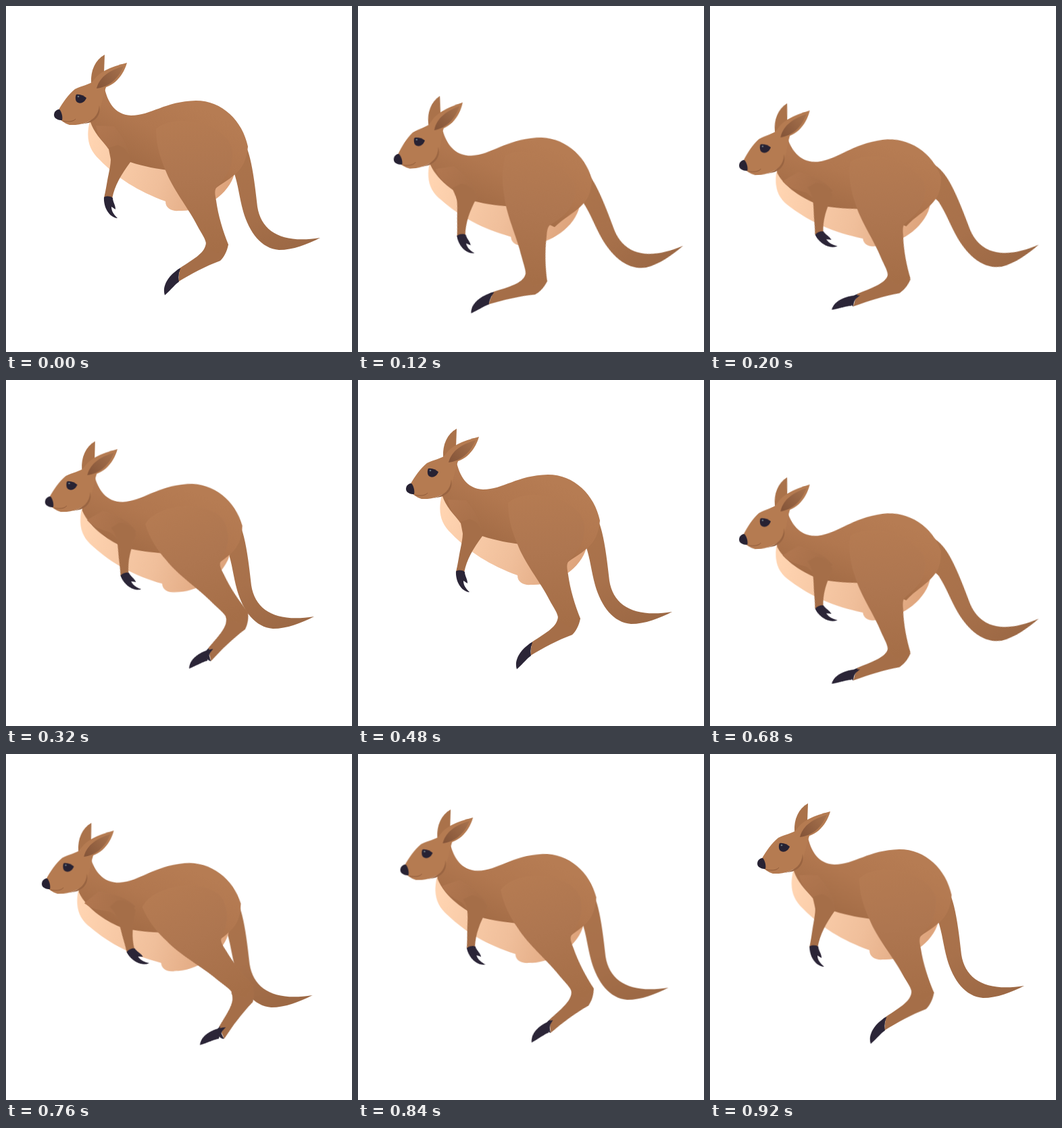
An HTML page that plays this animation: 512 by 512 pixels, repeating every 960 ms.

```html
<!DOCTYPE html>
<html lang="en">
<head>
<meta charset="utf-8">
<title>Kangaroo hop</title>
<style>
  html, body { margin: 0; width: 100%; height: 100%; overflow: hidden; background: #fff; }
  svg { display: block; width: 100vw; height: 100vh; }
  g { transform-origin: 0 0; }
</style>
</head>
<body>
<svg viewBox="0 0 512 512">
  <defs>
    <linearGradient id="fur" gradientUnits="userSpaceOnUse" x1="270" y1="140" x2="215" y2="248">
      <stop offset="0" stop-color="#b67c53"/><stop offset=".5" stop-color="#b1774f"/><stop offset="1" stop-color="#a36c46"/>
    </linearGradient>
    <linearGradient id="thighFur" gradientUnits="userSpaceOnUse" x1="270" y1="165" x2="300" y2="360">
      <stop offset="0" stop-color="#b57b52"/><stop offset=".45" stop-color="#ae7650"/><stop offset="1" stop-color="#a56e47"/>
    </linearGradient>
    <linearGradient id="tailFur" gradientUnits="userSpaceOnUse" x1="345" y1="220" x2="410" y2="360">
      <stop offset="0" stop-color="#ab734b"/><stop offset=".5" stop-color="#a8714b"/><stop offset="1" stop-color="#9d6945"/>
    </linearGradient>
    <linearGradient id="cream" gradientUnits="userSpaceOnUse" x1="125" y1="200" x2="325" y2="270">
      <stop offset="0" stop-color="#ffd4b1"/><stop offset=".55" stop-color="#f0bf9b"/><stop offset="1" stop-color="#dea47c"/>
    </linearGradient>
    <linearGradient id="armFur" gradientUnits="userSpaceOnUse" x1="140" y1="180" x2="172" y2="232">
      <stop offset="0" stop-color="#b0764f"/><stop offset="1" stop-color="#a56e48"/>
    </linearGradient>
    <linearGradient id="earIn" gradientUnits="userSpaceOnUse" x1="136" y1="120" x2="172" y2="90">
      <stop offset="0" stop-color="#855539"/><stop offset="1" stop-color="#a6714c"/>
    </linearGradient>
  </defs>

  <g id="tail">
    <path fill="url(#tailFur)" d="M318 178C340 178 355 198 361 225C366 245 369 270 372 297C378 335 410 352 465 343C445 353 425 361 404 361C378 359 360 335 351 304C345 282 344 266 337 245L318 215Z"/>
  </g>

  <g id="body">
    <path fill="url(#cream)" d="M124 170C118 195 122 212 138 227C165 255 195 274 236 289C236 300 246 304 256 303C290 305 330 280 338 248L300 200L180 180Z"/>
    <path fill="url(#fur)" d="M146 122C150 140 160 161 185 162C215 162 235 141 281 140C320 140 350 170 358 208C356 228 350 240 339 249C328 259 314 265 300 278L240 243C225 241 205 238 184 231C165 222 135 200 125 172L125 140Z"/>
    <g id="thigh">
      <g id="foot">
        <path fill="#a56e48" d="M296 350C295 365 280 373 257 388L255 408C275 396 295 385 317 377C323 371 327 363 329 353L312 340Z"/>
        <path fill="#2b2537" d="M258 388C248 391 248 405 255 408Q254 398 258 388Z"/>
        <g id="toe">
          <path fill="#2b2537" d="M258 388C243 396 230 413 235 428C245 419 250 412 256 408Q254 398 258 388Z"/>
        </g>
      </g>
      <path fill="url(#thighFur)" d="M222 182C222 205 228 225 236 243C246 270 270 299 283 325C290 338 297 347 296 354L312 366L329 353C321 333 314 310 311 288C309 278 308 271 313 267C328 250 335 240 335 215C330 175 250 155 222 182Z"/>
    </g>
    <g id="arm">
      <path fill="url(#armFur)" d="M133 177C136 195 145 202 152 212L156 232L184 231C184 212 174 195 160 178Z"/>
      <g id="forearm">
        <path fill="#a56e48" d="M152 210C157 222 155 234 152 248C149 262 148 272 145 284L157 285C161 265 170 250 184 231C183 218 175 208 165 206Z"/>
        <g id="hand">
          <path fill="#2b2537" d="M145 283C149 281 154 281 158 284C158 290 162 294 162 301L156 297C156 304 160 309 165 314C153 313 144 298 145 283Z"/>
        </g>
      </g>
    </g>
  </g>

  <g id="head">
    <path fill="#aa724a" d="M126 114C125 95 132 80 146 72L145 100Z"/>
    <path fill="#b57b51" d="M77 155C84 143 92 131 102 123C112 118 122 117 132 110L148 120C143 135 141 150 136 160C128 172 108 177 94 176C87 174 80 168 77 166Z"/>
    <path fill="#996441" d="M138 147C141 162 132 170 122 173L111 175C128 171 137 162 138 147Z"/>
    <path fill="#b57b51" d="M126 116C134 98 155 90 179 84C172 108 155 122 134 123Z"/>
    <path fill="url(#earIn)" d="M134 122C139 103 155 95 174 89C166 108 152 120 134 122Z"/>
    <path fill="none" stroke="#905c3b" d="M84 170C93 172 100 171 103 167"/>
    <path fill="#272233" d="M72 157C75 153 79 152 80 154C83 159 84 164 83 169C77 169 68 166 72 157Z"/>
    <path fill="#272233" d="M104 131C110 130 115 133 119 136C116 144 108 146 104 141C102 137 103 133 104 131Z"/>
    <circle cx="107" cy="134" r="1.3" fill="#68757f"/>
  </g>
</svg>
<script>
  const HOP = 480, STEP = 40;
  const times = [0, 120, 200, 280, 320, 440];

  // Root parts: place of the pivot and angle; limbs: angle on the stage.
  // The body also stretches (sx) and squashes (sy).
  const parts = {
    body:    { at: [290, 210], x: [290, 277, 272.5, 278.5, 281.3, 289.5], y: [210, 262, 263, 228.5, 221.5, 211], r: [0, -3.2, -6.8, -4.4, -3.1, -.3],
               sx: [1, 1.02, 1.03, 1.02, 1.01, 1], sy: [1, .97, .95, .97, .975, 1] },
    tail:    { at: [335, 215], x: [335, 324, 329, 323.5, 326, 335], y: [215, 262, 261, 229, 222, 215], r: [0, -14, -14.2, 0, 0, 0] },
    head:    { at: [111, 137], x: [111, 91, 82, 92.5, 97.5, 110], y: [137, 200.5, 210.5, 167.5, 156, 138], r: [0, -4.2, -2.5, -1, -.6, 0] },
    thigh:   { at: [285, 215], on: 'body', r: [0, 14.5, 6.1, -21.3, -16.4, -1.2] },
    foot:    { at: [310, 360], on: 'thigh', r: [0, 14.3, 9.7, -27, -17.4, -.7] },
    toe:     { at: [256, 398], on: 'foot', r: [0, 16, 31.6, 24.4, 19.8, .5] },
    arm:     { at: [150, 185], on: 'body', r: [0, -10.7, -34.2, -42.5, -33, -2] },
    forearm: { at: [168, 222], on: 'arm', r: [0, -10.7, -14.4, -25.3, -16.3, -1.5] },
    hand:    { at: [151, 283], on: 'forearm', r: [0, -11, -28, -30, -23, -3] }
  };

  const n = times.length;
  const wrap = i => (i + n) % n;
  const timeAt = i => times[wrap(i)] + Math.floor(i / n) * HOP;

  // Smooth periodic curve through the key poses.
  function curve(v, t) {
    const val = i => v[wrap(i)];
    const slope = i => (val(i + 1) - val(i)) / (timeAt(i + 1) - timeAt(i));
    const tangent = i => {
      const a = timeAt(i) - timeAt(i - 1), b = timeAt(i + 1) - timeAt(i);
      return (slope(i - 1) * b + slope(i) * a) / (a + b);
    };
    let i = n - 1;
    while (times[i] > t) i--;
    const h = timeAt(i + 1) - times[i], u = (t - times[i]) / h, w = 1 - u;
    return w * w * (1 + 2 * u) * val(i) + u * u * (3 - 2 * u) * val(i + 1)
         + h * u * w * (w * tangent(i) - u * tangent(i + 1));
  }

  function pose({ at: [px, py], on, x, y, r, sx, sy }, t) {
    const get = (v, rest) => v ? curve(v, t) : rest;
    const angle = curve(r, t) - (on ? curve(parts[on].r, t) : 0);
    return `translate(${get(x, px)}px, ${get(y, py)}px) rotate(${angle}deg) `
         + `scale(${get(sx, 1)}, ${get(sy, 1)}) translate(${-px}px, ${-py}px)`;
  }

  for (const [id, part] of Object.entries(parts)) {
    const frames = [];
    for (let t = 0; t <= HOP; t += STEP)
      frames.push({ offset: t / HOP, transform: pose(part, t % HOP), easing: 'step-end' });
    document.getElementById(id).animate(frames, { duration: HOP, iterations: Infinity });
  }
</script>
</body>
</html>
```
